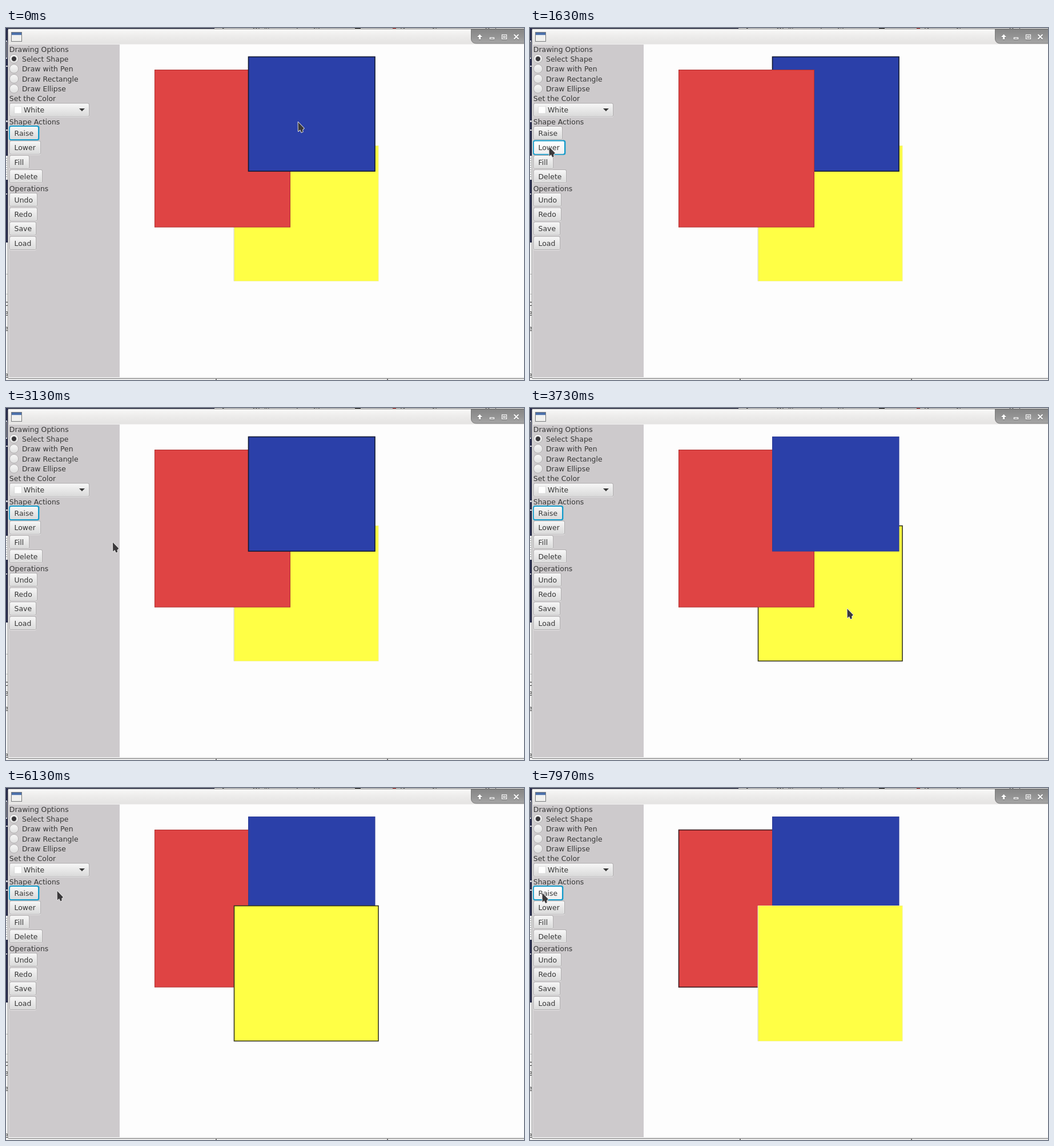
Write an HTML page with a canvas that moves like this. It is 907 px wide and 617 px high and loops after 8000 ms.

```html
<!DOCTYPE html>
<html lang="en">
<head>
<meta charset="utf-8">
<title>Drawing tool</title>
<style>
  html, body { margin: 0; width: 100%; height: 100%; overflow: hidden; background: #fdfdfd; }
  canvas { display: block; width: 907px; height: 617px; }
</style>
</head>
<body>
<canvas id="stage" width="907" height="617"></canvas>
<script>
const ctx = document.getElementById('stage').getContext('2d');
const LOOP = 8000;
const FONT = '12.48px "DejaVu Sans", sans-serif';
const INK = '#363636';

// Pointer journeys: start, end, destination
const home = [511, 164.5];
const moves = [
  [100, 950, [33, 208]],
  [1750, 2150, [28, 185]],
  [2920, 3500, [555, 351.5]],
  [3830, 4700, [34, 178]],
  [5950, 6600, [325, 188]],
  [7080, 7750, [21, 183.5]]
];
const presses = [[1240, 1350], [2640, 2750], [5100, 5220]];

const shapes = {
  red: { box: [260.5, 73.5, 237, 275.5], fill: '#df4444', edge: '#ae3030', active: '#401b20' },
  blue: { box: [424.5, 50.5, 221.5, 200.5], fill: '#2b40a9', edge: '#2b3b91', active: '#111833' },
  yellow: { box: [399.5, 206.5, 252.5, 237], fill: '#ffff45', edge: '#f4f28a', active: '#35351f' }
};

// Stacking order, selection and focused button from each moment on
const states = [
  [0, ['yellow', 'red', 'blue'], 'blue', 'Raise'],
  [1240, ['yellow', 'red', 'blue'], 'blue', 'Lower'],
  [1350, ['yellow', 'blue', 'red'], 'blue', 'Lower'],
  [2640, ['yellow', 'blue', 'red'], 'blue', 'Raise'],
  [2750, ['yellow', 'red', 'blue'], 'blue', 'Raise'],
  [3600, ['yellow', 'red', 'blue'], 'yellow', 'Raise'],
  [5220, ['red', 'blue', 'yellow'], 'yellow', 'Raise'],
  [6780, ['red', 'blue', 'yellow'], 'red', 'Raise']
];

const labels = [['Drawing Options', 37.5], ['Set the Color', 123.5], ['Shape Actions', 164], ['Operations', 281]];
const radios = [['Select Shape', 54], ['Draw with Pen', 71.5], ['Draw Rectangle', 89], ['Draw Ellipse', 106.5]];
const buttons = [
  ['Raise', 184, 51], ['Lower', 209.5, 55], ['Fill', 235, 35], ['Delete', 260, 58],
  ['Undo', 301, 49], ['Redo', 326.5, 49], ['Save', 351.5, 47], ['Load', 377, 47]
];

function rect(color, x, y, w, h) {
  ctx.fillStyle = color;
  ctx.fillRect(x, y, w, h);
}

function shade(y, h, ...colors) {
  const g = ctx.createLinearGradient(0, y, 0, y + h);
  colors.forEach((c, i) => g.addColorStop(i / (colors.length - 1), c));
  return g;
}

function rounded(fill, x, y, w, h, r) {
  ctx.fillStyle = fill;
  ctx.beginPath();
  ctx.roundRect(x, y, w, h, r);
  ctx.fill();
}

function path(points, close) {
  ctx.beginPath();
  points.forEach(([x, y]) => ctx.lineTo(x, y));
  if (close) ctx.closePath();
}

function text(s, x, mid, color = INK) {
  ctx.font = FONT;
  ctx.fillStyle = color;
  ctx.fillText(s, x, mid + 4.5);
}

function clipped(x, y, w, h, draw) {
  ctx.save();
  ctx.beginPath();
  ctx.rect(x, y, w, h);
  ctx.clip();
  draw();
  ctx.restore();
}

function drawDesktop() {
  rect('#f2f2f2', 0, 0, 907, 617);
  rect('#272b4b', 0, 0, 365, 3);
  rect('#272b4b', 0, 0, 4, 376);
  rect('#d7d8df', 0, 22, 2, 32);
  rect('#11131f', 0, 24, 1, 28);
  rect('#c9cad3', 0, 66, 3, 2);
  rect('#c9cad3', 0, 162, 3, 3);
  rect('#e0e0e4', 0, 178, 3, 2);
  rect('#f0f0f0', 0, 224, 3, 42);
  for (let y = 228; y < 262; y += 4) rect('#9a9aa0', 0, y, 2, 1);
  rect('#d5d5d8', 0, 290, 2, 2);
  rect('#b8b8b8', 0, 431, 3, 1);
  rect('#c4c4c4', 0, 466, 3, 1);
  clipped(0, 470, 4, 145, () =>
    ['c', 'e', 'e', 'l', 'i', 'e'].forEach((s, i) => text(s, -3, [482, 499, 526, 552, 580, 608][i], '#222')));
  clipped(366, 0, 541, 2, () => {
    [['Appears QL %', 376], ['Java Shapes', 508], ['Drawing Canvas', 690], ['Options', 838]]
      .forEach(([s, x]) => text(s, x, 3, '#555'));
    rect('#222', 611, 0, 10, 2);
    rect('#c33', 677, 0, 6, 2);
  });
  for (const x of [367, 667]) rect('#777', x, 614, 2, 3);
}

function drawWindow() {
  rect('#707070', 3, 1, 904, 1);
  rect('#8c8c8c', 3, 3, 1, 611);
  rect(shade(2, 27, '#f8f8f7', '#ecebea', '#e4e3e2'), 4, 2, 903, 27);
  rect('#fdfdfd', 4, 28.5, 903, 584);
  rect('#cdcacc', 5, 29, 194, 583);
  rect('#f4f4f4', 4, 29, 1, 584);
  rect('#e9e9e9', 4, 612, 903, 2);
  rect('#777', 4, 614, 903, 1);

  // Window icon
  rect('#77797b', 9, 7, 19, 17);
  rect('#f1f1ef', 10, 8, 17, 15);
  rect('#4c70a9', 10, 8, 17, 4);
  rect('#c6d4e7', 10, 12, 17, 1);

  rounded(shade(2, 25, '#868686', '#939393', '#a6a6a6'), 814.5, 2, 96, 25, [0, 0, 0, 8]);
  ctx.lineWidth = 1;
  ctx.strokeStyle = '#787878';
  ctx.stroke();
  drawControls();
}

function drawControls() {
  for (const [color, dy] of [['#555', 0.8], ['#fff', 0]]) {
    ctx.save();
    ctx.translate(0, dy);
    ctx.fillStyle = ctx.strokeStyle = color;
    path([[829.5, 11], [834, 16], [831, 16], [831, 20], [828, 20], [828, 16], [825, 16]], true);
    ctx.fill();
    ctx.lineWidth = 1.3;
    ctx.strokeRect(847.5, 17, 7, 2.5);
    ctx.strokeRect(868.5, 12, 8, 7.5);
    ctx.strokeRect(871, 14.5, 3, 2.5);
    ctx.lineWidth = 2;
    path([[889.5, 11.5], [897.5, 19.5]]);
    ctx.stroke();
    path([[897.5, 11.5], [889.5, 19.5]]);
    ctx.stroke();
    ctx.restore();
  }
}

function drawRadio(s, y, on) {
  ctx.fillStyle = shade(y - 8, 16, '#f8f8f8', '#dedede');
  ctx.strokeStyle = '#b1afb0';
  ctx.lineWidth = 1;
  ctx.beginPath();
  ctx.arc(14, y, 7.7, 0, 7);
  ctx.fill();
  ctx.stroke();
  if (on) {
    ctx.fillStyle = '#3b393c';
    ctx.beginPath();
    ctx.arc(14, y, 4.2, 0, 7);
    ctx.fill();
  }
  text(s, 28, y);
}

function drawButton(s, y, w, focused, hover, pressed) {
  const top = y - 12;
  if (focused) rounded('#159bca', 5.2, top - 1, w + 2.2, 26, 3.5);
  else {
    rounded('#e2e0e1', 6, top + 1, w, 24.3, 3);
    rounded('#b0aeaf', 6, top, w, 24, 3);
  }
  const tones = pressed ? ['#cfcfcf', '#d8d8d8'] : hover ? ['#fff', '#eee'] : ['#f5f5f5', '#dadada'];
  rounded('#fafafa', 7, top + 1, w - 2, 22, 2);
  rounded(shade(top + 2, 21, ...tones), 7.5, top + 2, w - 3, 21, 2);
  text(s, 14.5, y);
}

function drawPanel(state, pointer, pressed) {
  labels.forEach(([s, y]) => text(s, 5.8, y));
  radios.forEach(([s, y], i) => drawRadio(s, y, i === 0));

  drawButton('', 143.5, 140, false, false, false);
  rect('#c9c9c9', 14.5, 137, 13, 13);
  rect('#fff', 15, 137.5, 12, 12);
  text('White', 31, 143.5);
  ctx.fillStyle = INK;
  path([[128, 141], [138, 141], [133, 146]], true);
  ctx.fill();

  const [px, py] = pointer;
  for (const [s, y, w] of buttons) {
    const hover = px >= 6 && px < 6 + w && Math.abs(py - y) < 12;
    drawButton(s, y, w, s === state[3], hover, hover && pressed);
  }
}

function drawShape(name, selected) {
  const { box: [x, y, w, h], fill, edge, active } = shapes[name];
  rect(fill, x, y, w, h);
  ctx.strokeStyle = selected ? active : edge;
  ctx.lineWidth = selected ? 1.6 : 1;
  ctx.strokeRect(x, y, w, h);
  if (name === 'yellow' && !selected) rect('#d8d8c8', x - 1, y, 1, h);
}

function pointerAt(t) {
  let from = home;
  for (const [start, end, to] of moves) {
    if (t < start) break;
    const k = Math.min(1, (t - start) / (end - start));
    const e = k * k * (3 - 2 * k);
    from = from.map((v, i) => v + (to[i] - v) * e);
  }
  return from;
}

function drawPointer([x, y]) {
  ctx.save();
  ctx.translate(x, y);
  path([[0.5, 0.5], [0.8, 16.5], [4, 13.8], [6.3, 18.5], [8.8, 17.2], [8, 14], [10.8, 11.3]], true);
  ctx.lineJoin = 'round';
  ctx.strokeStyle = '#e8e8e8';
  ctx.lineWidth = 1.8;
  ctx.stroke();
  ctx.fillStyle = '#3b393b';
  ctx.fill();
  ctx.restore();
}

function render(t) {
  const state = states.filter(s => s[0] <= t).pop();
  const pointer = pointerAt(t);
  const pressed = presses.some(([a, b]) => t >= a && t < b);
  drawDesktop();
  drawWindow();
  drawPanel(state, pointer, pressed);
  state[1].forEach(name => drawShape(name, name === state[2]));
  drawPointer(pointer);
}

const began = performance.now();
function tick() {
  render((performance.now() - began) % LOOP);
  requestAnimationFrame(tick);
}
tick();
</script>
</body>
</html>
```
